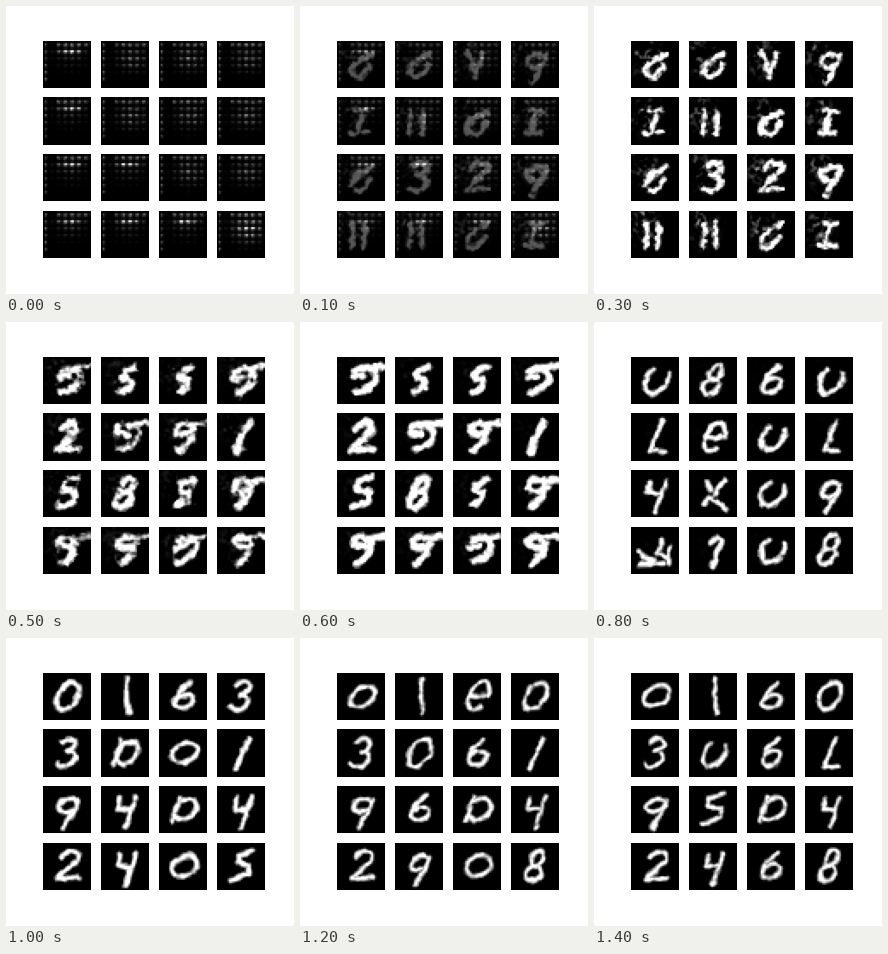
A matplotlib script for the animation above (1500 ms loop, 288 by 288 pixels).

```python
import numpy as np
import matplotlib.pyplot as plt
from matplotlib.animation import FuncAnimation

SIZE, FRAMES = 28, 15
SLANT = 0.35
FLOOR = -1.6                  # lowest value of a distance field
Y, X = np.mgrid[:SIZE, :SIZE] + 0.5


def line(*xy):
    """Points along a polyline given as x, y, x, y, ..."""
    p = np.array(xy, float).reshape(-1, 2)
    k, t = np.arange(len(p)), np.linspace(0, len(p) - 1, 15 * len(p))
    return np.column_stack([np.interp(t, k, p[:, 0]), np.interp(t, k, p[:, 1])])


def arc(cx, cy, rx, ry, start=0, end=360):
    """Points along an ellipse, clockwise from the right, in degrees."""
    a = np.radians(np.linspace(start, end, 50))
    return np.column_stack([cx + rx * np.cos(a), cy + ry * np.sin(a)])


# upright strokes; the slant is added when they are drawn
GLYPHS = {
    "0": [arc(14.5, 14, 6, 8)],
    "o": [arc(15, 14, 7, 6)],
    "D": [arc(15.5, 14, 6, 6.5), line(10, 7, 10, 21)],
    "1": [line(12, 4, 14, 12, 20, 24)],
    "/": [line(16, 5, 15, 12, 14, 23)],
    "L": [line(15, 5, 14, 22, 22, 22)],
    "I": [line(9, 8, 16, 8), line(13, 8, 14, 21), line(11, 21, 20, 21)],
    "2": [arc(14, 10, 5, 4.5, 190, 390), line(18, 12, 11, 21.5, 23, 21)],
    "3": [arc(13, 9.5, 4.5, 3.7, 210, 440), arc(14.5, 17.5, 5, 4.5, 270, 500)],
    "4": [line(9, 8, 10, 14, 18, 14), line(18, 7, 18, 25)],
    "6": [arc(15.5, 17, 5, 4), line(15, 6, 11, 12, 10.5, 17)],
    "7": [line(11, 10, 14, 7, 17, 8, 17, 14, 17, 24)],
    "8": [arc(14, 9.5, 3.5, 4.5), arc(14.5, 18, 4.5, 4.5)],
    "9": [arc(14, 12, 5, 4), line(19, 9, 18.5, 16, 16, 25)],
    "C": [arc(15, 14, 6.5, 7.5, -30, 230)],
    "e": [line(10, 14, 19, 14), arc(15, 14, 5.5, 8, 0, -310)],
    "S": [line(17, 5, 10, 8, 11, 12, 19, 14, 20, 19, 11, 22)],
    "s": [line(17, 6, 12, 9, 12, 13, 17, 14, 18, 18, 14, 21)],
    "J": [arc(14, 14, 8, 7, 230, 450), line(9, 12, 14, 12), line(16, 7, 24, 6)],
    "T": [arc(14, 9, 5.5, 3.5, 20, 250), line(18, 9, 19, 16, 15, 22), line(15, 7, 24, 6)],
    "H": [line(7, 8, 11, 21), line(14, 8, 18, 21)],
    "v": [line(7, 8, 15, 21), line(15, 8, 15, 20)],
    "k": [arc(14.5, 16.5, 5, 5, -20, 220), line(10, 16, 12, 12, 18, 8)],
    "m": [line(5, 15, 9, 18, 16, 20), line(16, 8, 17, 16, 23, 19),
          line(22, 12, 25, 22), line(7, 22, 22, 22)],
    "x": [line(8, 8, 12, 12), line(18, 7, 11, 21), line(13, 17, 25, 23)],
}

# step: (glyph of each cell row by row, half width of the strokes)
POSES = {
    3: ("kkv9 IHkI k329 HHkI", 1.6),
    6: ("JssJ 2JT/ S8sT TTJT", 2.1),
    8: ("C86C LeCL 4xC9 m7C8", 1.4),
    10: ("0163 3Do/ 94D4 24oS", 1.45),
    12: ("o1e0 306/ 96D4 29o8", 1.25),
    14: ("o160 3C6L 9SD4 2468", 1.25),
}
TIMES = list(POSES)


def smooth_noise(rng, passes):
    n = rng.normal(size=(SIZE, SIZE))
    for _ in range(passes):
        for axis in (0, 1):
            n = (np.roll(n, 1, axis) + 2 * n + np.roll(n, -1, axis)) / 4
    return n / n.std()


def stroke_field(glyph, width, rng):
    """Signed distance to a glyph, with a slightly uneven hand."""
    p = np.vstack(GLYPHS[glyph])
    px = p[:, 0] + SLANT * (14 - p[:, 1])
    x, y = (g + 0.35 * smooth_noise(rng, 8) for g in (X, Y))
    dist = np.hypot(x[..., None] - px, y[..., None] - p[:, 1]).min(axis=-1)
    return np.maximum(FLOOR, width - dist)


def cell_fields(i):
    rng = np.random.default_rng(200 + i)
    return [stroke_field(names.replace(" ", "")[i], width, rng)
            for names, width in POSES.values()]


fields = [cell_fields(i) for i in range(16)]


def bump(cx, cy, sx, sy):
    return np.exp(-((X - cx) / sx)**2 - ((Y - cy) / sy)**2)


def checker(i):
    """Untrained output: a dotted lattice, lit at the top or to the right."""
    rng = np.random.default_rng(40 + i)
    if "t..."  "t..." "tt.." "ttt."[i] == "t":
        glow = bump(16, 6.5, 6, 2) + 0.25 * bump(16, 8, 8, 8)
    else:
        glow = (0.95 if i == 15 else 0.5) * bump(18, 10.5, 8, 7)
    cols = np.where(X.astype(int) % 4 < 2, 1, 0.25)
    rows = np.array([0.15, 0.1, 0.95, 0.5])[Y.astype(int) % 4]
    edge = 0.35 * (X < 3) * (Y < 24) * (X > 1)
    top = 0.3 * (Y < 4) * (X > 8)
    return np.clip((glow + edge + top) * cols * rows * rng.uniform(0.6, 1.3, X.shape), 0, 1)


def digit(i, t):
    """Blend the distance fields of the two nearest poses."""
    rng = np.random.default_rng(1000 + 16 * t + i)
    k = min(np.searchsorted(TIMES, t, side="right") - 1, len(TIMES) - 2)
    u = (t - TIMES[k]) / (TIMES[k + 1] - TIMES[k])
    field = (1 - u) * fields[i][k] + u * fields[i][k + 1]
    rough = 0.2 + 0.4 * np.exp(-(t - 3) / 4)
    near = np.clip((field - FLOOR) / 1.2, 0, 1)
    img = 0.5 + 0.6 * (field + rough * near * smooth_noise(rng, 1))
    # grey specks on the left that fade as the digits sharpen
    haze = 0.28 * np.exp(-(t - 3) / 1.5)
    img = np.maximum(img, haze * smooth_noise(rng, 1) * bump(8, 9, 7, 9))
    return np.clip(img, 0, 1)


def picture(i, t):
    start = TIMES[0]
    if t >= start:
        return digit(i, t)
    u = t / start
    return (1 - u) * checker(i) + u * digit(i, start)


fig, axes = plt.subplots(4, 4, figsize=(4, 4), dpi=72, facecolor="white")
fig.subplots_adjust(left=0.125, right=0.9, bottom=0.125, top=0.88, wspace=0.2, hspace=0.2)
images = []
for i, ax in enumerate(axes.flat):
    ax.axis("off")
    images.append(ax.imshow(picture(i, 0), cmap="gray", vmin=0, vmax=1))


def update(t):
    for i, image in enumerate(images):
        image.set_data(picture(i, t))
    return images


anim = FuncAnimation(fig, update, frames=FRAMES, interval=100, repeat=True, repeat_delay=0)
plt.show()
```
